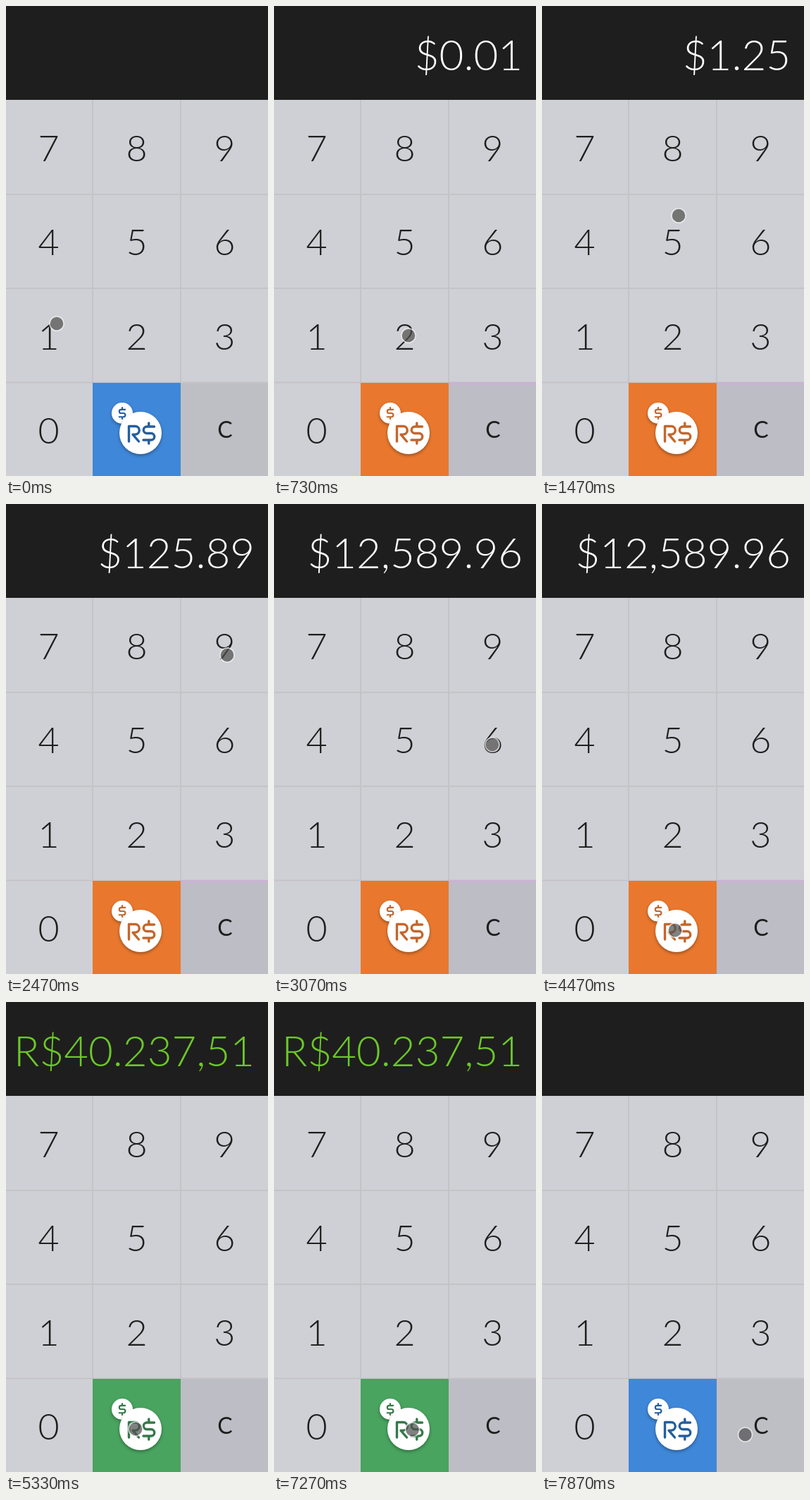
An HTML page for the animation above (8 s loop, 372 by 666 pixels).

```html
<!DOCTYPE html>
<html lang="en">
<head>
<meta charset="utf-8">
<title>Currency keypad</title>
<style>
  html, body { margin: 0; width: 100%; height: 100%; overflow: hidden; background: #1e1e1e; }
  svg { display: block; width: 372px; height: 666px; font-family: Lato, sans-serif; }
  .key { font-size: 52px; font-weight: 300; text-anchor: middle; fill: #1e1e1e; }
  .clear { font-size: 32px; font-weight: 400; text-anchor: middle; fill: #1e1e1e; }
  #amount { font-size: 60px; font-weight: 300; text-anchor: end; fill: #fff; }
  #button { fill: var(--face); }
  .glyph { fill: none; stroke: var(--ink); stroke-linecap: round; stroke-linejoin: round; }
  .coin { fill: #fff; filter: drop-shadow(0 2px 2px rgba(0, 0, 0, .35)); }
  .idle { --face: #3f87d8; --ink: #235f9f; }
  .dollars { --face: #e9782e; --ink: #c4662b; }
  .reais { --face: #48a45f; --ink: #35794a; }
  #clearKey { fill: #bebfc4; }
  .dollars #clearKey { fill: #bcbdc5; }
  .reais #clearKey { fill: #bdbdc5; }
  #clearEdge { fill: #c8b4d2; visibility: hidden; }
  .dollars #clearEdge { visibility: visible; }
  .reais #amount { fill: #6cc828; }
  #pointer { fill: rgba(80, 80, 80, .72); stroke: rgba(255, 255, 255, .7); stroke-width: 1.6; }
</style>
</head>
<body>
<svg id="stage" class="idle" viewBox="0 0 372 666">
  <defs>
    <path id="dollar" d="M210.5 596H200a4.75 4.75 0 0 0 0 9.5h6a4.75 4.75 0 0 1 0 9.5H195M202.8 591v5M202.8 615v5"/>
  </defs>
  <rect width="372" height="666" fill="#1e1e1e"/>
  <rect y="133" width="372" height="533" fill="#cfd0d5"/>
  <rect id="clearKey" x="248" y="534" width="124" height="132"/>
  <path d="M123 133V534M248 133V534M0 267H372M0 400H372M0 533.5H372" stroke="#c5c3c7" stroke-width="2"/>
  <rect id="clearEdge" x="248" y="533" width="124" height="4"/>
  <rect id="button" x="123" y="534" width="125" height="132"/>
  <g id="keys"></g>
  <text class="clear" x="311" y="612">C</text>
  <circle class="coin" cx="165" cy="577" r="15"/>
  <use href="#dollar" class="glyph" stroke-width="4" transform="translate(165 577) scale(.55) translate(-202.8 -605.5)"/>
  <circle class="coin" cx="191" cy="605" r="30"/>
  <path class="glyph" stroke-width="3.4" d="M174.5 617V595.5H183.5a5.8 5.8 0 0 1 0 11.6H180L188.5 617"/>
  <use href="#dollar" class="glyph" stroke-width="3.4"/>
  <text id="amount" x="353" y="91"></text>
  <circle id="pointer" r="10"/>
</svg>
<script>
  const FPS = 15, LOOP = 8000;
  const $ = id => document.getElementById(id);
  const stage = $('stage'), amount = $('amount'), pointer = $('pointer');

  // [tick, display text, state]
  const entries = [
    [0, '', 'idle'],
    [3, '$0.01', 'dollars'],
    [14, '$0.12', 'dollars'],
    [22, '$1.25', 'dollars'],
    [28, '$12.58', 'dollars'],
    [37, '$125.89', 'dollars'],
    [39, '$1,258.99', 'dollars'],
    [46, '$12,589.96', 'dollars'],
    [79, 'R$40.237,51', 'reais'],
    [117, '', 'idle']
  ];

  // [start tick, end tick, x, y]
  const moves = [
    [5, 11, 191, 467],
    [14, 20, 194, 297],
    [22, 26, 194, 249],
    [28, 34, 314, 214],
    [38, 44, 310, 341],
    [56, 67, 189, 604],
    [67, 69, 188, 605],
    [69, 70, 184, 605],
    [108, 114, 288.5, 613]
  ];

  const ease = u => (u + u * u * (3 - 2 * u)) / 2;

  function pointerAt(tick) {
    let x = 72, y = 450;
    for (const [start, end, toX, toY] of moves) {
      if (tick <= start) break;
      const k = ease(Math.min(1, (tick - start) / (end - start)));
      x += (toX - x) * k;
      y += (toY - y) * k;
    }
    return [x, y];
  }

  ['789', '456', '123', '0'].forEach((row, r) => [...row].forEach((digit, c) => {
    const key = document.createElementNS(stage.namespaceURI, 'text');
    key.setAttribute('class', 'key');
    key.setAttribute('x', 60.7 + c * 124.8);
    key.setAttribute('y', 219.7 + r * 133.4);
    key.textContent = digit;
    $('keys').append(key);
  }));

  let lastTick = -1;
  function render(now) {
    // Small offset absorbs times rounded to 10 ms.
    const tick = Math.floor(((now % LOOP) + 5) * FPS / 1000) % (LOOP * FPS / 1000);
    if (tick !== lastTick) {
      lastTick = tick;
      const [, text, state] = entries.filter(e => e[0] <= tick).pop();
      amount.textContent = text;
      stage.setAttribute('class', state);
      const [x, y] = pointerAt(tick);
      pointer.setAttribute('cx', x);
      pointer.setAttribute('cy', y);
    }
  }

  const began = performance.now();
  function loop() {
    render(performance.now() - began);
    requestAnimationFrame(loop);
  }
  loop();
</script>
</body>
</html>
```
